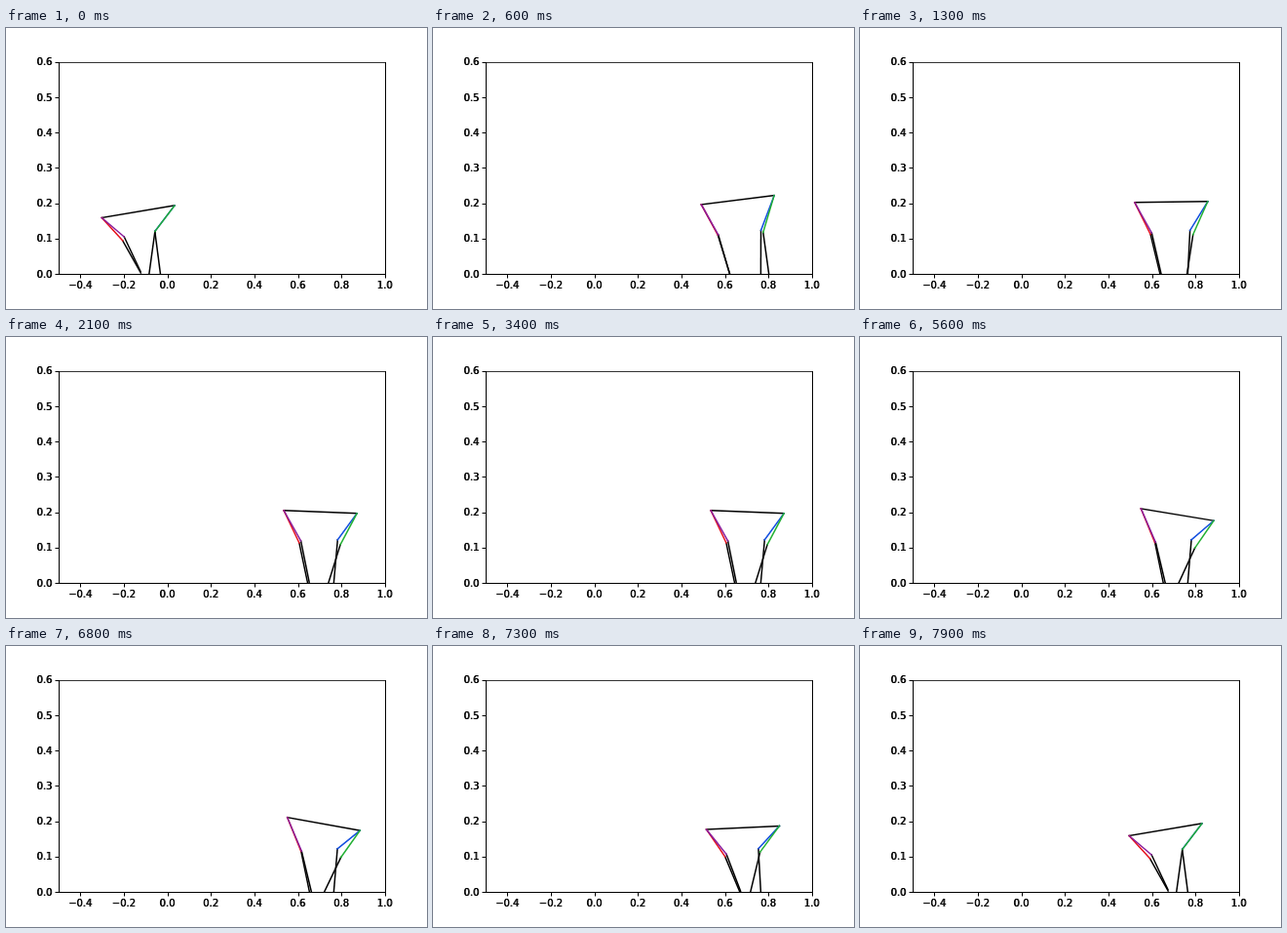
Animation of 432 by 288 pixels, one loop 8 s. Source, as an HTML page with a canvas:

```html
<!DOCTYPE html>
<html>
<head>
<meta charset="utf-8">
<style>
html, body { margin: 0; width: 100%; height: 100%; overflow: hidden; background: #fff; }
canvas { display: block; }
</style>
</head>
<body>
<canvas id="stage" width="432" height="288"></canvas>
<script>
const ctx = document.getElementById('stage').getContext('2d');
const LEFT = 54, RIGHT = 388.8, TOP = 34.56, BASE = 252;
const STEP = 100, FRAMES = 80;

// Plot units
const BODY = 0.336, THIGH = 0.116, SHIN = 0.123;
const STRIDE = 0.797, PLANTED = { x: 0.765, y: 0 };

// Rear hip position and body pitch, then thigh and shin angles of each free
// leg, in degrees from straight down
const LAND = { x: 0.4915, y: 0.196, pitch: 4.4, red: [41.4, 26.5], purple: [42.4, 25.3], green: [-25.9, 12.6] };
const STAND = { x: 0.5354, y: 0.2047, pitch: -1.4, red: [37.6, 18.9], purple: [42.4, 18.2], green: [-40.8, -26.9] };
const CROUCH = { x: 0.5515, y: 0.2105, pitch: -6.3, red: [33.2, 18.6], purple: [34.5, 21.4], green: [-49.1, -38] };
const PUSH = { x: 0.4955, y: 0.1587, pitch: 5.9, red: [56, 42.4], purple: [62.4, 37.5], green: [-50.8, -12.6] };

const MOVES = [
  { a: LAND, b: STAND, from: 600, to: 2100 },
  { a: STAND, b: CROUCH, from: 4600, to: 6000 },
  { a: CROUCH, b: PUSH, from: 6800, to: 7900 }
];

const px = x => LEFT + (x + 0.5) * 223.2;
const py = y => BASE - y * 362.4;
const rad = deg => deg * Math.PI / 180;
const snap = v => Math.floor(v + 0.5) + 0.5;

const mix = (a, b, u) => Array.isArray(a) ? a.map((v, i) => mix(v, b[i], u)) : a + (b - a) * u;

function poseAt(t) {
  const { a, b, from, to } = MOVES.findLast(m => m.from <= t) || MOVES[0];
  const u = Math.sin(Math.min(1, (t - from) / (to - from)) * Math.PI / 2);
  const pose = {};
  for (const key in a) pose[key] = mix(a[key], b[key], u);
  return pose;
}

// End of a link hanging from p at an angle from straight down
const hang = (p, length, angle) =>
  ({ x: p.x + length * Math.sin(angle), y: p.y - length * Math.cos(angle) });

function line(x1, y1, x2, y2, color = '#000', width = 1) {
  ctx.strokeStyle = color;
  ctx.lineWidth = width;
  ctx.beginPath();
  ctx.moveTo(x1, y1);
  ctx.lineTo(x2, y2);
  ctx.stroke();
}

const link = (p, q, color) => line(px(p.x), py(p.y), px(q.x), py(q.y), color, 1.5);

function drawLeg(hip, knee, foot, color) {
  link(knee, foot);
  link(hip, knee, color);
}

function drawFreeLeg(hip, [thigh, shin], color) {
  const knee = hang(hip, THIGH, rad(thigh));
  drawLeg(hip, knee, hang(knee, SHIN, rad(shin)), color);
}

// The knee follows from the hip and the fixed foot
function drawPlantedLeg(hip, foot, color) {
  const dx = foot.x - hip.x, dy = hip.y - foot.y, d = Math.hypot(dx, dy);
  const cos = (THIGH ** 2 + d ** 2 - SHIN ** 2) / (2 * THIGH * d);
  const knee = hang(hip, THIGH, Math.atan2(dx, dy) - Math.acos(Math.min(1, cos)));
  drawLeg(hip, knee, foot, color);
}

function drawWalker(pose) {
  const rear = { x: pose.x, y: pose.y };
  const front = hang(rear, BODY, rad(90 + pose.pitch));
  ctx.lineCap = 'square';
  link(rear, front);
  drawFreeLeg(rear, pose.red, '#e6101c');
  drawFreeLeg(rear, pose.purple, '#8a1c9c');
  drawPlantedLeg(front, PLANTED, '#1450e0');
  drawFreeLeg(front, pose.green, '#22b033');
  ctx.lineCap = 'butt';
}

// Drawn twice, slightly apart, for the heavy look of the tick labels
function label(value, x, y) {
  const text = value.toFixed(1).replace('-', '\u2212');
  for (const shift of [-0.3, 0.3]) ctx.fillText(text, x + shift, y);
}

function drawAxes() {
  const l = snap(LEFT), r = snap(RIGHT), t = snap(TOP), b = snap(BASE);
  line(l, t, r, t, '#333');
  line(l, t - 0.5, l, b + 0.5);
  line(r, t - 0.5, r, b + 0.5);
  line(l, b, r, b);

  ctx.font = '10px "DejaVu Sans", sans-serif';
  ctx.fillStyle = '#000';
  ctx.textAlign = 'center';
  for (let i = -2; i <= 5; i++) {
    const x = px(i / 5);
    line(snap(x), 253, snap(x), 256.5);
    label(i / 5, x, 267);
  }
  ctx.textAlign = 'right';
  for (let i = 0; i <= 6; i++) {
    const y = py(i / 10);
    line(50.5, snap(y), LEFT, snap(y));
    label(i / 10, 47.5, Math.round(y + 3.7));
  }
}

function draw(now) {
  const frame = Math.floor(now / STEP) % FRAMES;
  ctx.fillStyle = '#fff';
  ctx.fillRect(0, 0, 432, 288);
  ctx.save();
  ctx.beginPath();
  ctx.rect(LEFT, TOP, RIGHT - LEFT, BASE - TOP);
  ctx.clip();
  // The loop opens on the closing pose, one stride further back
  if (frame === 0) ctx.translate(px(0) - px(STRIDE), 0);
  drawWalker(poseAt((frame || FRAMES - 1) * STEP));
  ctx.restore();
  drawAxes();
}

const start = performance.now();
function tick() {
  draw(performance.now() - start);
  requestAnimationFrame(tick);
}
tick();
</script>
</body>
</html>
```
